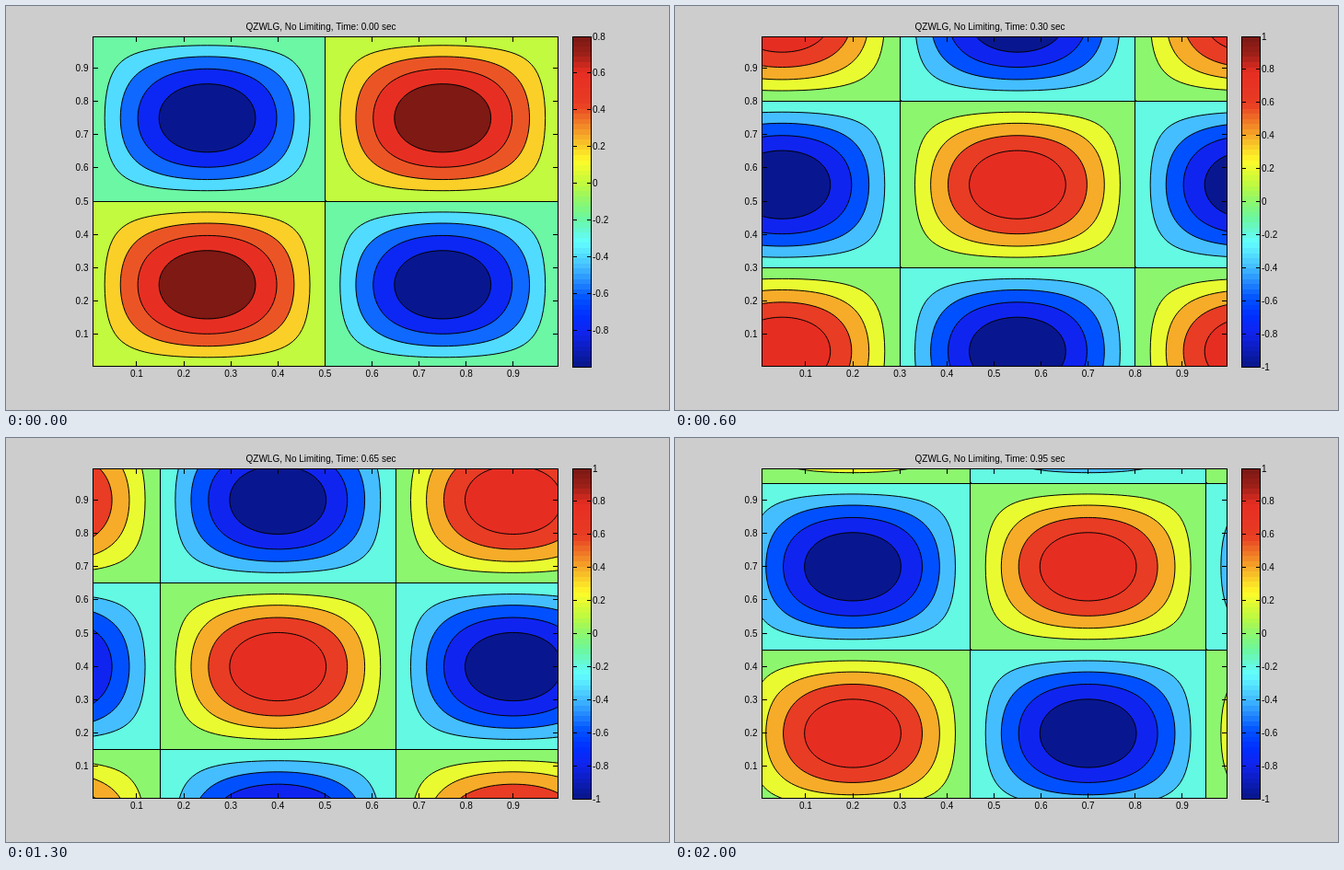
Recreate the animation shown at these times as an HTML page with a canvas. Size 720 by 439 pixels, loop 2100 ms.

```html
<!DOCTYPE html>
<html lang="en">
<head>
<meta charset="utf-8">
<title>Contour plot</title>
<style>
  html, body { margin: 0; width: 100%; height: 100%; overflow: hidden; background: #cdcdcd; }
  canvas { display: block; width: 720px; height: 439px; }
</style>
</head>
<body>
<canvas id="plot" width="720" height="439"></canvas>
<script>
const ctx = document.getElementById('plot').getContext('2d');

// Simulation step shown in each 100 ms slot; one step is 0.05 s.
const SLOT = 100;
const STEPS = [0, 0, 1, 2, 3, 4, 6, 6, 7, 8, 9, 10, 11, 13, 13, 14, 15, 16, 17, 18, 19];

const BOX = { x: 94, y: 33, w: 505, h: 358 };
const BAR = { x: 615, y: 33, w: 20, h: 359 };
const SX = 511.25, SY = 362.2;
const X = x => 346.4 + (x - 0.5) * SX;
const Y = y => 212 - (y - 0.5) * SY;
const snap = v => Math.floor(v) + 0.5;

const RAMP = [
  [0, 8, 23, 143], [0.1, 16, 36, 240], [0.15, 0, 48, 255], [0.2, 0, 80, 255],
  [0.3, 68, 190, 255], [0.375, 98, 255, 255], [0.4, 100, 249, 226], [0.45, 108, 247, 156],
  [0.5, 140, 247, 110], [0.55, 188, 250, 64], [0.625, 255, 251, 40], [0.7, 246, 172, 40],
  [0.8, 232, 60, 36], [0.9, 230, 45, 34], [0.95, 159, 32, 24], [1, 126, 25, 20]
];

function ramp(f) {
  f = Math.min(1, Math.max(0, f));
  let i = 1;
  while (i < RAMP.length - 1 && RAMP[i][0] < f) i++;
  const a = RAMP[i - 1], b = RAMP[i], p = (f - a[0]) / (b[0] - a[0]);
  const mix = c => Math.round(a[c] + (b[c] - a[c]) * p);
  return `rgb(${mix(1)},${mix(2)},${mix(3)})`;
}

// Closed curve |sin(2πx) sin(2πy)| = level around one extremum, in pixels.
function contour(level) {
  const path = new Path2D(), q = Math.PI / 2, r = q - Math.asin(level), n = 96;
  for (let i = 0; i < n; i++) {
    const s = i / n * 2 * Math.PI;
    const u = r * Math.cos(s);
    const v = Math.sign(Math.sin(s)) * (q - Math.asin(Math.min(1, level / Math.cos(u))));
    path.lineTo(u / (2 * Math.PI) * SX, -v / (2 * Math.PI) * SY);
  }
  path.closePath();
  return path;
}
const RINGS = [0.2, 0.4, 0.6, 0.8].map(contour);

function line(x1, y1, x2, y2) {
  ctx.beginPath();
  ctx.moveTo(x1, y1);
  ctx.lineTo(x2, y2);
  ctx.stroke();
}

function text(s, x, y, align) {
  ctx.fillStyle = '#000';
  ctx.textAlign = align;
  ctx.fillText(s, x, y);
}

function drawCell(cx, cy, positive, color) {
  const level = k => color(positive ? 0.2 * k : -0.2 * (k + 1));
  const x0 = snap(X(cx - 0.25)), x1 = snap(X(cx + 0.25));
  const y0 = snap(Y(cy + 0.25)), y1 = snap(Y(cy - 0.25));
  ctx.fillStyle = level(0);
  ctx.fillRect(x0, y0, x1 - x0, y1 - y0);
  ctx.save();
  ctx.translate(X(cx), Y(cy) + 0.3);
  RINGS.forEach((ring, k) => {
    ctx.fillStyle = level(k + 1);
    ctx.fill(ring);
    ctx.stroke(ring);
  });
  ctx.restore();
}

function drawField(t, color) {
  ctx.save();
  ctx.beginPath();
  ctx.rect(BOX.x, BOX.y, BOX.w + 1, BOX.h + 1);
  ctx.clip();
  for (let i = -2; i < 2; i++)
    for (let j = -2; j < 2; j++)
      drawCell(0.25 + i / 2 + t, 0.25 + j / 2 + t, (i + j) % 2 === 0, color);

  const zeros = [-1, -0.5, 0, 0.5].map(z => z + t).filter(z => z > 0.01 && z < 0.99);
  const notched = Math.abs(t % 0.5 - 0.15) > 0.01;
  for (const z of zeros) {
    line(snap(X(z)), BOX.y, snap(X(z)), BOX.y + BOX.h);
    line(BOX.x, snap(Y(z)), BOX.x + BOX.w, snap(Y(z)));
  }
  if (notched)
    for (const a of zeros)
      for (const b of zeros) {
        const x = snap(X(a)), y = snap(Y(b));
        line(x, y - 2, x + 2, y);
      }
  ctx.restore();
}

function drawAxes() {
  const { x, y, w, h } = BOX;
  ctx.strokeRect(x + 0.5, y + 0.5, w, h);
  for (let i = 1; i < 10; i++) {
    const v = i / 10, px = snap(X(v)), py = snap(Y(v));
    line(px, y, px, y + 6);
    line(px, y + h - 5, px, y + h);
    line(x, py, x + 6, py);
    line(x + w - 5, py, x + w, py);
    text(v.toFixed(1), X(v), 403, 'center');
    text(v.toFixed(1), 89.5, Y(v) + 3.5, 'right');
  }
}

function drawBar(top) {
  const { x, y, w, h } = BAR;
  for (let i = 0; i < 64; i++) {
    const y0 = Math.round(y + h * (63 - i) / 64), y1 = Math.round(y + h * (64 - i) / 64);
    ctx.fillStyle = ramp(i / 63);
    ctx.fillRect(x, y0, w, y1 - y0);
  }
  ctx.strokeRect(x + 0.5, y + 0.5, w, h);
  for (let i = top < 1 ? -4 : -5; i <= top * 5; i++) {
    const py = snap(y + h * (top - i / 5) / (top + 1));
    line(x, py, x + 5, py);
    line(x + w - 4, py, x + w + 1, py);
    text(String(i / 5), 637, py + 3.5, 'left');
  }
}

function draw(step) {
  const t = step / 20, top = step ? 1 : 0.8;
  ctx.fillStyle = '#cdcdcd';
  ctx.fillRect(0, 0, 720, 439);
  ctx.font = '10px "Liberation Sans", Arial, sans-serif';
  ctx.strokeStyle = '#000';
  ctx.lineWidth = 1;
  drawField(t, v => ramp((v + 1) / (top + 1)));
  drawAxes();
  drawBar(top);
  text(`QZWLG, No Limiting, Time: ${t.toFixed(2)} sec`, 342, 26, 'center');
}

const start = performance.now();
let shown = -1;
function tick() {
  const slot = Math.floor((performance.now() - start) / SLOT) % STEPS.length;
  if (STEPS[slot] !== shown) draw(shown = STEPS[slot]);
  requestAnimationFrame(tick);
}
tick();
</script>
</body>
</html>
```
